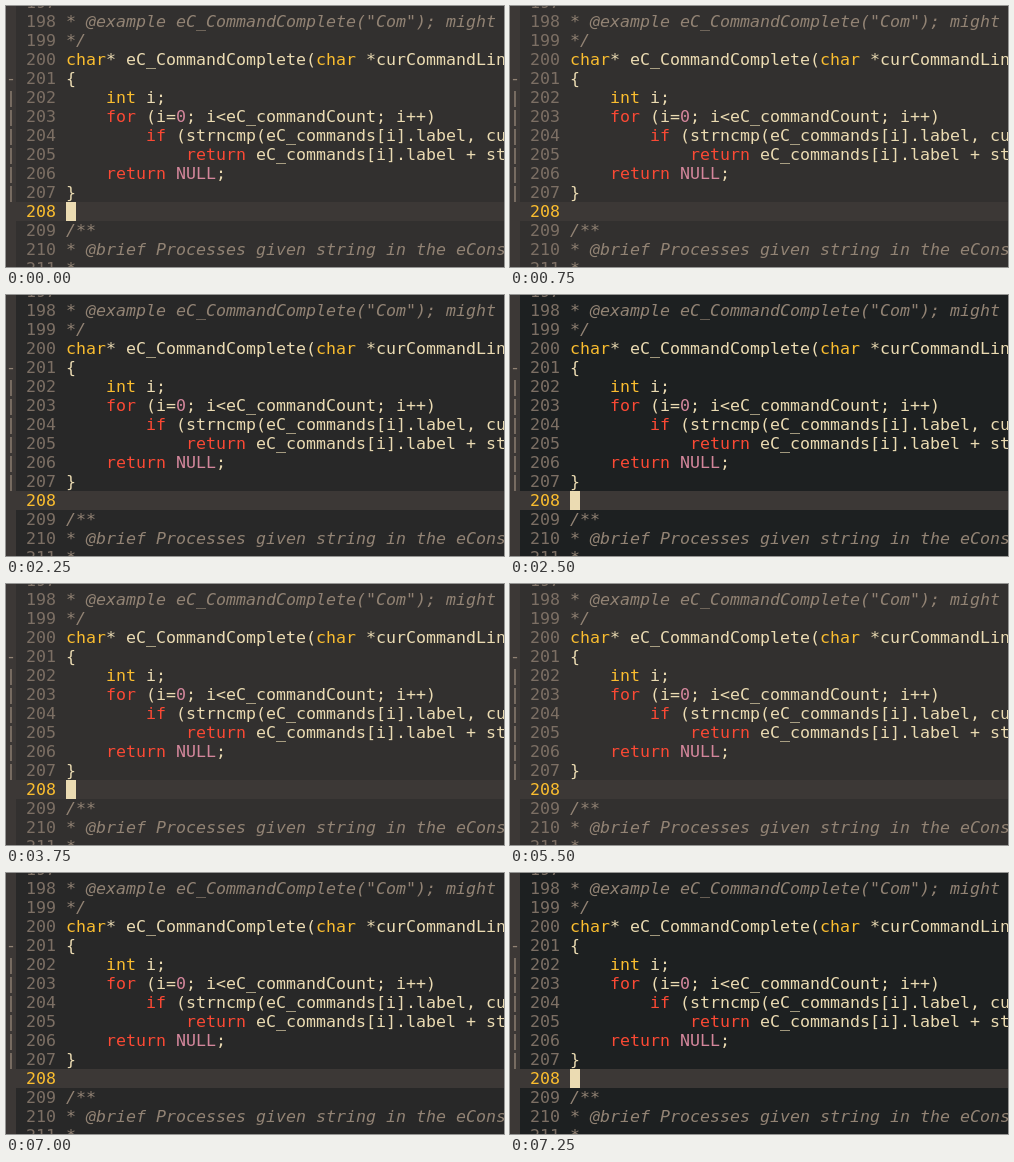
Animation of 498x261 px, one loop 8000 ms. Source, as an HTML page:

```html
<!DOCTYPE html>
<html lang="en">
<head>
<meta charset="utf-8">
<title>Editor contrast</title>
<style>
  html, body { margin: 0; width: 100%; height: 100%; overflow: hidden; }
  #editor {
    position: relative; width: 498px; height: 261px; overflow: hidden;
    background: #32302f; color: #ebdbb2;
    font: 16.61px/19px "DejaVu Sans Mono", monospace;
    font-variant-ligatures: none;
  }
  #folds { position: absolute; inset: 0 auto 0 0; width: 10px; background: #3c3836; }
  .row { position: absolute; left: 0; width: 498px; height: 19px; }
  .row.current { background: #3c3836; }
  .row > span { position: absolute; top: 0; white-space: pre; }
  .fold { left: 0; color: #928374; }
  .number { left: 20px; color: #7c6f64; }
  .current .number { color: #fabd2f; }
  .code { left: 60px; }
  .comment { color: #928374; font-style: italic; }
  .type { color: #fabd2f; }
  .keyword { color: #fb4934; }
  .constant { color: #d3869b; }
  #cursor { position: absolute; left: 60px; top: 196px; width: 10px; height: 19px; background: #ebdbb2; }
</style>
</head>
<body>
<div id="editor"><div id="folds"></div></div>
<script>
const FIRST_LINE = 197, CURRENT_LINE = 208, ROW_HEIGHT = 19, TOP = -13;
const LOOP = 8000;
const SOFT = '#32302f', MEDIUM = '#282828', HARD = '#1d2021';

const source = [
  '',
  '* @example eC_CommandComplete("Com"); might',
  '*/',
  'char* eC_CommandComplete(char *curCommandLine)',
  '{',
  '    int i;',
  '    for (i=0; i<eC_commandCount; i++)',
  '        if (strncmp(eC_commands[i].label, cur',
  '            return eC_commands[i].label + str',
  '    return NULL;',
  '}',
  '',
  '/**',
  '* @brief Processes given string in the eCons',
  '*',
];

const editor = document.getElementById('editor');

function add(parent, tag, className, text = '') {
  const node = document.createElement(tag);
  node.className = className;
  node.textContent = text;
  return parent.appendChild(node);
}

function tokenClass(token) {
  if (/^(char|int)$/.test(token)) return 'type';
  if (/^(for|if|return)$/.test(token)) return 'keyword';
  if (/^(0|NULL)$/.test(token)) return 'constant';
  return '';
}

function foldMark(line) {
  if (line === 201) return '-';
  return line > 201 && line < 208 ? '|' : '';
}

source.forEach((text, i) => {
  const line = FIRST_LINE + i;
  const row = add(editor, 'div', line === CURRENT_LINE ? 'row current' : 'row');
  row.style.top = TOP + i * ROW_HEIGHT + 'px';
  add(row, 'span', 'fold', foldMark(line));
  add(row, 'span', 'number', line);
  const isComment = /^(\*|\/\*)/.test(text);
  const code = add(row, 'span', isComment ? 'code comment' : 'code');
  if (isComment) code.textContent = text;
  else text.split(/\b(char|int|for|if|return|NULL|0)\b/)
    .forEach(token => add(code, 'span', tokenClass(token), token));
});

const cursor = add(editor, 'div', '');
cursor.id = 'cursor';

// Each step holds its value until the next one.
function playSteps(node, property, steps) {
  const frames = steps.map(([time, value]) =>
    ({ offset: time / LOOP, [property]: value, easing: 'step-end' }));
  frames.push({ offset: 1, [property]: steps[steps.length - 1][1] });
  node.animate(frames, { duration: LOOP, iterations: Infinity });
}

playSteps(editor, 'backgroundColor', [
  [0, SOFT], [1000, MEDIUM], [2500, HARD], [3750, SOFT], [5750, MEDIUM], [7250, HARD],
]);
playSteps(cursor, 'opacity', [
  [0, 1], [750, 0], [1000, 1], [2250, 0], [2500, 1],
  [5500, 0], [5750, 1], [7000, 0], [7250, 1],
]);
</script>
</body>
</html>
```
